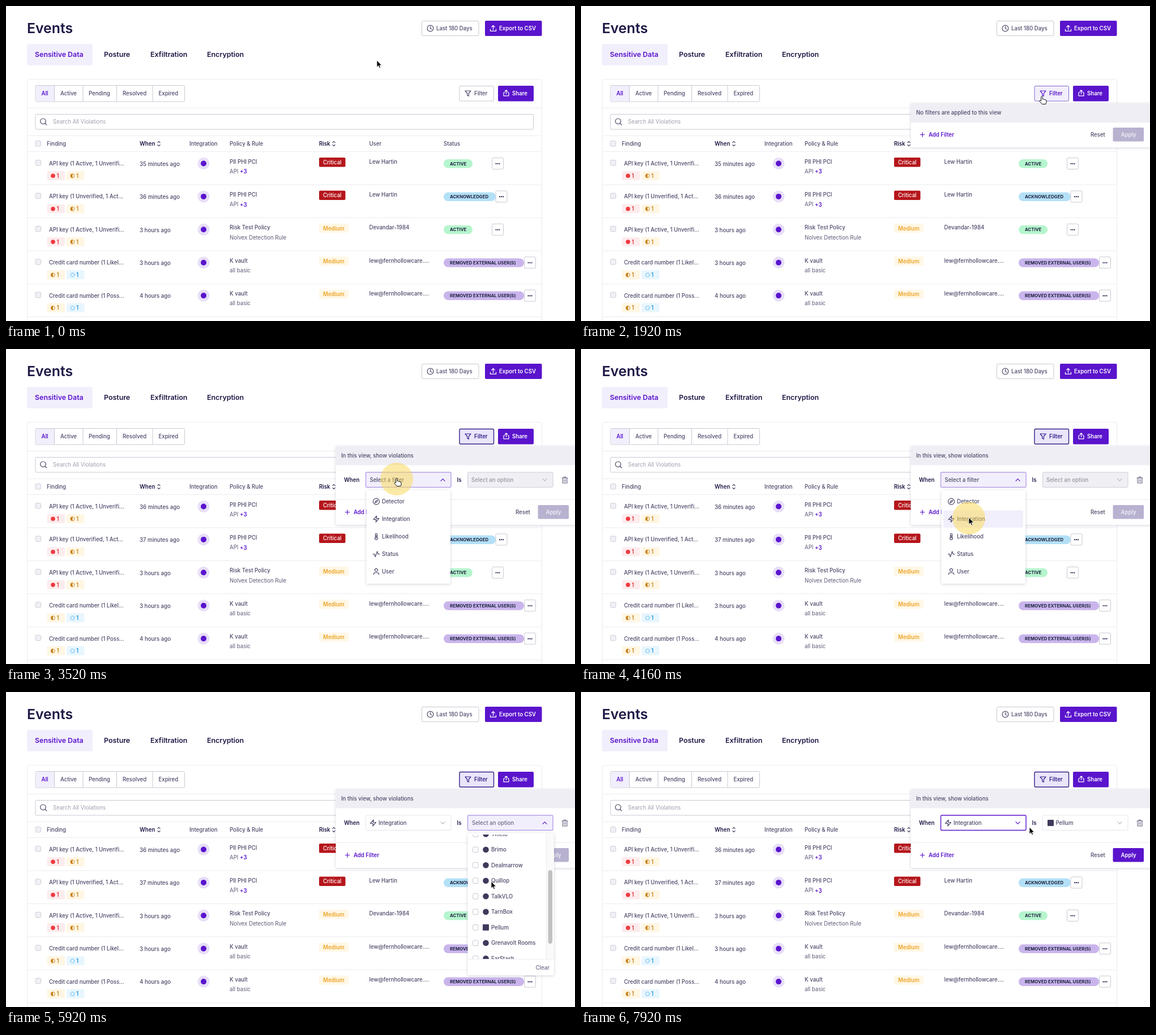
An HTML page for the animation above (8 s loop, 1005 by 557 pixels).

```html
<!DOCTYPE html>
<html lang="en">
<head>
<meta charset="utf-8">
<title>Events</title>
<style>
html, body { margin: 0; width: 100%; height: 100%; overflow: hidden; background: #fff; }
svg { display: block; }
text { font: 500 9.65px Inter, "Open Sans", sans-serif; fill: #4b4868; dominant-baseline: central; white-space: pre; }
.b { font-weight: 600; }
.dark { fill: #1d1845; }
.p { fill: #5a14cc; }
.w { fill: #fff; }
.soft { fill: #6d6b86; }
.thin { fill: #5d5b78; font-weight: 400; }
.hint { fill: #a09fae; font-weight: 400; }
.title { font-size: 24.8px; font-weight: 600; }
.tab { font-size: 12.4px; font-weight: 600; }
.pill { font-size: 7.85px; font-weight: 700; fill: #1f2340; }
.line { stroke: #ececf1; fill: none; }
.box { fill: #fff; stroke: #c9c8d3; }
.check { fill: #f1f0f5; stroke: #cfced9; }
.lav { fill: #f2effc; }
.ico { fill: none; stroke: #4b4868; stroke-width: 1.2; stroke-linecap: round; stroke-linejoin: round; }
.ico.w { stroke: #fff; }
.ico.p { stroke: #5a14cc; }
.ico.pale { stroke: #b9b8c6; }
.ico.soft { stroke: #77758f; }
.pop { filter: drop-shadow(0 1px 2.5px rgba(40, 30, 80, .2)); }
</style>
</head>
<body>
<svg width="1005" height="557" viewBox="0 0 1005 557">
  <defs>
    <path id="upload" d="M0 2.5V-5M-2.8-2.3 0-5 2.8-2.3M-5 1.5V4.8H5V1.5"/>
    <path id="share" d="M0 1.5V-5.2M-2.3-3 0-5.2 2.3-3M-2.5-1H-4.5V4.8H4.5V-1H2.5"/>
    <path id="funnel" d="M-5-4.5H5L1.3 0V4.8L-1.3 3.4V0Z"/>
    <path id="up" d="M-3.5 1.8 0-1.8 3.5 1.8"/>
    <path id="down" d="M-3.5-1.8 0 1.8 3.5-1.8"/>
    <path id="sort" d="M-2.2-1.8 0-4 2.2-1.8M-2.2 1.8 0 4 2.2 1.8"/>
    <path id="plus" d="M-3.8 0H3.8M0-3.8V3.8"/>
    <path id="bolt" d="M.8-5.5-5 1H0L-.8 5.5 5-1H0Z"/>
    <path id="compass" d="M5.5 0A5.5 5.5 0 1 1-5.5 0 5.5 5.5 0 1 1 5.5 0M2.4-2.4 1 1-2.4 2.4-1-1Z"/>
    <path id="thermo" d="M-1.5 1.2V-4.2A1.5 1.5 0 0 1 1.5-4.2V1.2A2.5 2.5 0 1 1-1.5 1.2M0-2V3"/>
    <path id="pulse" d="M-5.5 0H-3.2L-1.6 4.8 1.6-4.8 3.2 0H5.5"/>
    <path id="person" d="M2.5-2.8A2.5 2.5 0 1 1-2.5-2.8 2.5 2.5 0 1 1 2.5-2.8M-4.5 5V4Q-4.5 1.8-2 1.8H2Q4.5 1.8 4.5 4V5"/>
    <path id="trash" d="M-5-3.4H5M-2-3.4V-5.2H2V-3.4M-4-3.4V5.4H4V-3.4M-1.4-.8V3M1.4-.8V3"/>
    <clipPath id="window"><rect x="816" y="252" width="138" height="220"/></clipPath>
  </defs>

  <!-- page head -->
  <text class="title dark" x="37" y="39">Events</text>
  <rect class="box" x="734.5" y="26.5" width="100.5" height="26" rx="2"/>
  <g class="ico"><circle cx="749.5" cy="39.5" r="5.4"/><path d="M749.5 36V39.8L752 41"/></g>
  <text x="760" y="39.5">Last 180 Days</text>
  <rect class="p" x="846" y="26" width="100.5" height="27" rx="2"/>
  <use href="#upload" class="ico w" x="860.5" y="39.5"/>
  <text class="b w" x="871" y="39.5">Export to CSV</text>
  <rect class="lav" x="37" y="67" width="116" height="38" rx="3"/>
  <text class="tab p" x="51" y="85.5">Sensitive Data</text>
  <text class="tab dark" x="173" y="85.5">Posture</text>
  <text class="tab dark" x="255" y="85.5">Exfiltration</text>
  <text class="tab dark" x="355" y="85.5">Encryption</text>

  <!-- card -->
  <rect class="line" x="37.5" y="129.5" width="909" height="440" rx="3"/>
  <path class="line" d="M38 180.5H946M38 229.5H946M38 257.5H946"/>
  <rect class="box" x="52" y="140.5" width="263.5" height="28.5" rx="2"/>
  <rect class="lav" x="52.5" y="141" width="32.5" height="27.5"/>
  <path d="M85.5 141V169M136 141V169M195.5 141V169M259 141V169" stroke="#c9c8d3"/>
  <text class="b p" x="62.5" y="154.5">All</text>
  <text x="96" y="154.5">Active</text>
  <text x="146" y="154.5">Pending</text>
  <text x="206" y="154.5">Resolved</text>
  <text x="269.5" y="154.5">Expired</text>

  <g data-on="0-1440">
    <rect class="box" x="801" y="141.5" width="60.5" height="26.5" rx="2"/>
    <use href="#funnel" class="ico" x="816" y="154.5"/><text x="827" y="154.5">Filter</text>
  </g>
  <g data-on="1440-2000">
    <rect class="lav" x="801" y="141.5" width="60.5" height="26.5" rx="2" stroke="#8568cf"/>
    <use href="#funnel" class="ico p" x="816" y="154.5"/><text class="b p" x="827" y="154.5">Filter</text>
  </g>
  <g data-on="2000-8000">
    <rect x="801" y="141.5" width="60.5" height="26.5" rx="2" fill="#ebe5fa" stroke="#34208a" stroke-width="1.4"/>
    <use href="#funnel" class="ico" x="816" y="154.5" style="stroke:#34208a"/><text class="b" x="827" y="154.5" style="fill:#34208a">Filter</text>
  </g>
  <rect class="p" x="869" y="141" width="63" height="27.5" rx="2"/>
  <use href="#share" class="ico w" x="883.5" y="154"/>
  <text class="b w" x="894" y="154.5">Share</text>

  <rect class="box" x="52" y="191.5" width="879.5" height="26.5" rx="2"/>
  <g class="ico"><circle cx="65.5" cy="203.8" r="4.8"/><path d="M69 207.5 71.8 210.2"/></g>
  <text class="hint" x="83" y="204.5">Search All Violations</text>

  <rect class="check" x="52" y="238.5" width="9.5" height="9.5" rx="2"/>
  <text x="72" y="243.3">Finding</text>
  <text class="b dark" x="236" y="243.3">When</text><use href="#sort" class="ico" x="270" y="243.5"/>
  <text x="324" y="243.3">Integration</text>
  <text x="395" y="243.3">Policy &amp; Rule</text>
  <text class="b dark" x="553" y="243.3">Risk</text><use href="#sort" class="ico" x="579" y="243.5"/>
  <text x="641.5" y="243.3">User</text>
  <text x="773" y="243.3">Status</text>
  <g id="rows"></g>

  <!-- filter panel -->
  <g data-on="1840-8000">
    <g class="pop"><rect id="sheet" x="582.5" y="172" width="440" height="78" rx="2" fill="#fff"/></g>
    <rect x="582.5" y="172" width="423" height="33.5" fill="#efeef4"/>
    <text data-on="0-2480" x="592" y="188.3">No filters are applied to this view</text>
    <text data-on="2480-8000" x="592" y="188.3">In this view, show violations</text>
    <g id="foot">
      <path class="line" d="M583 205.5H1005"/>
      <use href="#plus" class="ico p" x="603" y="227.5"/>
      <text class="b p" x="614" y="227.3">Add Filter</text>
      <text x="900" y="227.3">Reset</text>
      <rect id="apply" x="939.5" y="215" width="54.5" height="24.5" rx="2"/>
      <text class="b w" id="applyText" x="953.5" y="227.3">Apply</text>
    </g>
    <g data-on="2480-8000">
      <text class="b dark" x="597" y="231.3">When</text>
      <text class="b dark" x="796.5" y="231.3">Is</text>
      <use href="#trash" class="ico soft" x="987" y="231.5"/>

      <rect id="first" x="635.5" y="218" width="150.5" height="26.5" rx="2"/>
      <text data-on="0-4240" x="642.5" y="231.3">Select a filter</text>
      <g data-on="4240-8000"><use href="#bolt" class="ico" x="648.5" y="231.5"/><text x="658" y="231.3">Integration</text></g>
      <use data-on="0-3520" href="#down" class="ico p" x="771.5" y="231.5"/>
      <use data-on="3520-4240" href="#up" class="ico p" x="771.5" y="231.5"/>
      <use data-on="4240-7700" href="#down" class="ico pale" x="771.5" y="231.5"/>
      <use data-on="7700-8000" href="#down" class="ico p" x="771.5" y="231.5"/>

      <rect id="second" x="815.5" y="218" width="150.5" height="26.5" rx="2"/>
      <text data-on="0-4240" x="822" y="231.3" style="fill:#97959f">Select an option</text>
      <text data-on="4240-6800" class="soft" x="823" y="231.3">Select an option</text>
      <g data-on="6800-8000"><rect x="824" y="226" width="11" height="11" rx="1" fill="#3d3a5c"/><text x="838.5" y="231.3">Pellum</text></g>
      <use data-on="0-5200" href="#down" class="ico pale" x="951.5" y="231.5"/>
      <use data-on="5200-7440" href="#up" class="ico p" x="951.5" y="231.5"/>
      <use data-on="7440-8000" href="#down" class="ico pale" x="951.5" y="231.5"/>
    </g>
    <g data-on="3520-4240">
      <g class="pop"><rect x="636.5" y="249.5" width="148.5" height="165.5" rx="2" fill="#fff"/></g>
      <rect id="hover" class="lav" x="640" width="141" height="30.5" rx="1"/>
      <g id="kinds"></g>
    </g>
    <g data-on="5200-7440">
      <g class="pop"><rect x="815.5" y="249.5" width="152.5" height="251.5" rx="2" fill="#fff"/></g>
      <g clip-path="url(#window)"><g id="apps"></g></g>
      <rect x="954" y="250" width="14" height="222" fill="#fafafa"/>
      <path class="line" d="M954.5 250V472"/>
      <rect id="thumb" x="957.5" width="7.5" height="130" rx="3.7" fill="#c1c1c1"/>
      <path class="line" d="M816 472.5H968"/>
      <text class="soft" x="935.5" y="487">Clear</text>
    </g>
  </g>

  <circle id="ring" fill="#f8d650"/>
  <g id="cursor" stroke-linejoin="round">
    <path id="arrow" d="M0 0V12.2L2.8 9.6 4.6 13.8 6.6 13 4.8 8.9H8.5Z" stroke="#fff" stroke-width=".8"/>
    <path id="hand" fill="#fff" stroke="#111" d="M-1.3 7.5V1.2Q-1.3 0 0 0T1.3 1.2V5Q2.6 4 3.7 5.3 5 4.7 6 6 8 5.5 8 7.5V10Q7.6 12 6.8 13.5H.3Q-1.5 11-4 8.6-4.6 7.2-3.2 7Z"/>
  </g>
</svg>
<script>
const LOOP = 8000;
const $ = id => document.getElementById(id);
const set = (el, attrs) => { for (const k in attrs) el.setAttribute(k, attrs[k]); };
const text = (x, y, s, cls = '') => `<text class="${cls}" x="${x}" y="${y}">${s}</text>`;
const rect = (x, y, w, h, fill, rx = 2) => `<rect x="${x}" y="${y}" width="${w}" height="${h}" rx="${rx}" fill="${fill}"/>`;

// table rows, drawn relative to the top of the first one
const badges = {
  red: ['#fdeced', '#e5343c', '<circle r="3.8" fill="#ee3a40"/>'],
  amber: ['#fff6e3', '#c9821c', '<circle r="3.4" fill="none" stroke="#d08a25"/><path d="M0-3.8A3.8 3.8 0 0 0 0 3.8Z" fill="#c9821c"/>'],
  blue: ['#e8f6fe', '#2196dc', '<circle r="3.3" fill="none" stroke="#2ca4e4" stroke-width="1.3" stroke-dasharray="1.3 1.3"/>']
};
const badge = (kind, x) => {
  const [bg, ink, mark] = badges[kind];
  return rect(x, 292, 31.5, 16, bg) + `<g transform="translate(${x + 10.5} 300.3)">${mark}</g>` +
    `<text class="b" x="${x + 17}" y="300.3" style="fill:${ink}">1</text>`;
};
const risks = {
  Critical: rect(553, 268, 46.5, 16.5, '#b5161b') + text(560, 276.3, 'Critical', 'w'),
  Medium: rect(553, 268, 52, 16, '#fff7e6') + '<text class="b" x="560" y="276.3" style="fill:#eda528">Medium</text>'
};
const states = {
  'ACTIVE': [51, '#b5f5cd', 858.5],
  'ACKNOWLEDGED': [92, '#b3e0f7', 865],
  'REMOVED EXTERNAL USER(S)': [142, '#c9b5ec', 915.5]
};
const status = name => {
  const [w, bg, x] = states[name];
  const dots = [-3, 0, 3].map(d => `<circle cx="${x + 10 + d}" cy="278.8" r="1.1" fill="#1d1845"/>`).join('');
  return rect(773, 271, w, 15.5, bg, 7.7) + text(784, 278.6, name, 'pill') +
    `<rect class="box" x="${x}" y="268.5" width="20" height="20" rx="2"/>` + dots;
};
const timed = (a, b) => `<g data-on="0-2480">${text(236, 279.3, a)}</g><g data-on="2480-8000">${text(236, 279.3, b)}</g>`;
const api = `API <tspan class="b p">+3</tspan>`;
const mail = 'lew@fernhollowcare....';
const gone = 'REMOVED EXTERNAL USER(S)';
const rows = [
  ['API key (1 Active, 1 Unverifi...', 'red', 'amber', timed('35 minutes ago', '36 minutes ago'), 'PII PHI PCI', api, 'Critical', 'Lew Hartin', 'ACTIVE'],
  ['API key (1 Unverified, 1 Act...', 'red', 'amber', timed('36 minutes ago', '37 minutes ago'), 'PII PHI PCI', api, 'Critical', 'Lew Hartin', 'ACKNOWLEDGED'],
  ['API key (1 Active, 1 Unverifi...', 'red', 'amber', text(236, 279.3, '3 hours ago'), 'Risk Test Policy', 'Nolvex Detection Rule', 'Medium', 'Devandar-1984', 'ACTIVE'],
  ['Credit card number (1 Likel...', 'amber', 'blue', text(236, 279.3, '3 hours ago'), 'K vault', 'all basic', 'Medium', mail, gone],
  ['Credit card number (1 Poss...', 'amber', 'blue', text(236, 279.3, '4 hours ago'), 'K vault', 'all basic', 'Medium', mail, gone]
];
$('rows').innerHTML = rows.map(([finding, b1, b2, when, policy, rule, risk, user, state], i) =>
  `<g transform="translate(0 ${(i * 58.4).toFixed(1)})">
    <rect class="check" x="52" y="272.5" width="9.5" height="9.5" rx="2"/>
    ${text(76, 278.6, finding)}${badge(b1, 72.5)}${badge(b2, 107)}${when}
    <circle cx="349" cy="278.5" r="10.5" fill="#e7def8"/><circle class="p" cx="349" cy="278.5" r="5"/>
    ${text(395, 275, policy)}${text(395, 292.3, rule, 'thin')}${risks[risk]}${text(641.5, 275, user)}${status(state)}
    <path class="line" d="M38 316H946"/>
  </g>`).join('');

$('kinds').innerHTML = [['compass', 'Detector'], ['bolt', 'Integration'], ['thermo', 'Likelihood'], ['pulse', 'Status'], ['person', 'User']]
  .map(([icon, name], i) => `<use href="#${icon}" class="ico" x="654" y="${269.7 + 31 * i}"/>` + text(664, 269.7 + 31 * i, name)).join('');

const apps = ['Korvane', 'Wikilume', 'Dropell', 'Ymelo', 'Brimo', 'Dealmarrow', 'Quillop', 'TalkVLO', 'TarnBox', 'Pellum', 'Grenavolt Rooms', 'FarStash', 'Sheldry'];
$('apps').innerHTML = apps.map((name, i) => {
  const y = 274.8 + 27.5 * i;
  const mark = name === 'Pellum' ? rect(842, y - 5.5, 11, 11, '#3d3a5c', 1) : `<circle cx="847.5" cy="${y}" r="5.3" fill="#3d3a5c"/>`;
  const tick = name === 'Pellum' ? `<g data-on="6800-8000">${rect(824, y - 5.3, 10.6, 10.6, '#5a14cc')}<path class="ico w" d="M826.6 ${y}l2 2.2 3.6-4.2"/></g>` : '';
  return `<rect class="box" x="824.5" y="${y - 4.8}" width="9.6" height="9.6" rx="2"/>` + tick + mark + text(857, y, name);
}).join('');

// motion
const path = [
  [600, 655, 96], [1440, 814, 160], [1920, 814, 160], [2400, 622, 225], [2620, 622, 225], [2880, 650, 223],
  [3200, 690, 229], [3520, 690, 229], [3920, 685, 298], [4240, 685, 298], [4880, 862, 231], [5200, 862, 231],
  [5440, 857, 335], [5960, 857, 335], [6560, 831, 413], [6840, 831, 413], [7120, 756, 292], [7580, 756, 292],
  [7760, 768, 241], [7920, 792, 239]
];
const clicks = [1760, 2400, 3440, 4080, 5120, 6720, 7360];
const hands = [[1500, 2020], [2320, 2660], [2760, 3600], [4720, 5230]];
const within = (t, a, b) => t >= a && t < b;
const ease = (t, a, b) => {
  const p = Math.min(1, Math.max(0, (t - a) / (b - a)));
  return p * p * (3 - 2 * p);
};
const pointer = t => {
  const i = path.findIndex(p => p[0] > t);
  if (i < 1) return (i ? path[path.length - 1] : path[0]).slice(1);
  const [a, x, y] = path[i - 1], [b, u, v] = path[i], k = ease(t, a, b);
  return [x + (u - x) * k, y + (v - y) * k];
};

const timedParts = [...document.querySelectorAll('[data-on]')].map(el => [el, ...el.dataset.on.split('-').map(Number)]);
const idle = { fill: '#fff', stroke: '#e6e5ec', 'stroke-width': 1 };
const focus = { fill: '#fff', stroke: '#5a14cc', 'stroke-width': 1.4 };
const open = { fill: '#f2effc', stroke: '#b5a1e4', 'stroke-width': 1.4 };
const disabled = { fill: '#f0eff4', stroke: '#cfcdda', 'stroke-width': 1 };

function draw(t) {
  for (const [el, a, b] of timedParts) el.style.display = within(t, a, b) ? '' : 'none';

  const drop = t < 2480 ? 0 : t < 3520 ? 53 : 61;
  set($('sheet'), { height: 78 + drop });
  set($('foot'), { transform: `translate(0 ${drop})` });
  set($('apply'), { fill: t < 6800 ? '#b8b2d0' : '#5a14cc' });
  set($('applyText'), { opacity: t < 6800 ? .75 : 1 });
  set($('first'), within(t, 3520, 4240) ? open : within(t, 2760, 3520) || t >= 7700 ? focus : idle);
  set($('second'), t < 4240 ? disabled : within(t, 5200, 7440) ? open : within(t, 4720, 5200) ? focus : idle);

  const [x, y] = pointer(t);
  const row = Math.floor((y - 254) / 31);
  set($('hover'), { y: 254.5 + 31 * row, opacity: row >= 0 && row < 5 ? 1 : 0 });

  const scroll = 106 * ease(t, 5440, 5880);
  set($('apps'), { transform: `translate(0 ${-scroll})` });
  set($('thumb'), { y: 252 + scroll * .594 });

  set($('cursor'), { transform: `translate(${x} ${y})` });
  const hand = hands.some(([a, b]) => within(t, a, b));
  $('hand').style.display = hand ? '' : 'none';
  $('arrow').style.display = hand ? 'none' : '';

  const click = clicks.find(c => within(t, c, c + 160));
  const p = click === undefined ? 1 : (t - click) / 160;
  set($('ring'), { cx: x, cy: y + 1, r: 20 + 9 * Math.min(1, 2 * p), opacity: .5 * Math.min(1, 2 - 2 * p) });
}

const start = performance.now();
function tick() {
  draw((performance.now() - start) % LOOP);
  requestAnimationFrame(tick);
}
tick();
</script>
</body>
</html>
```
